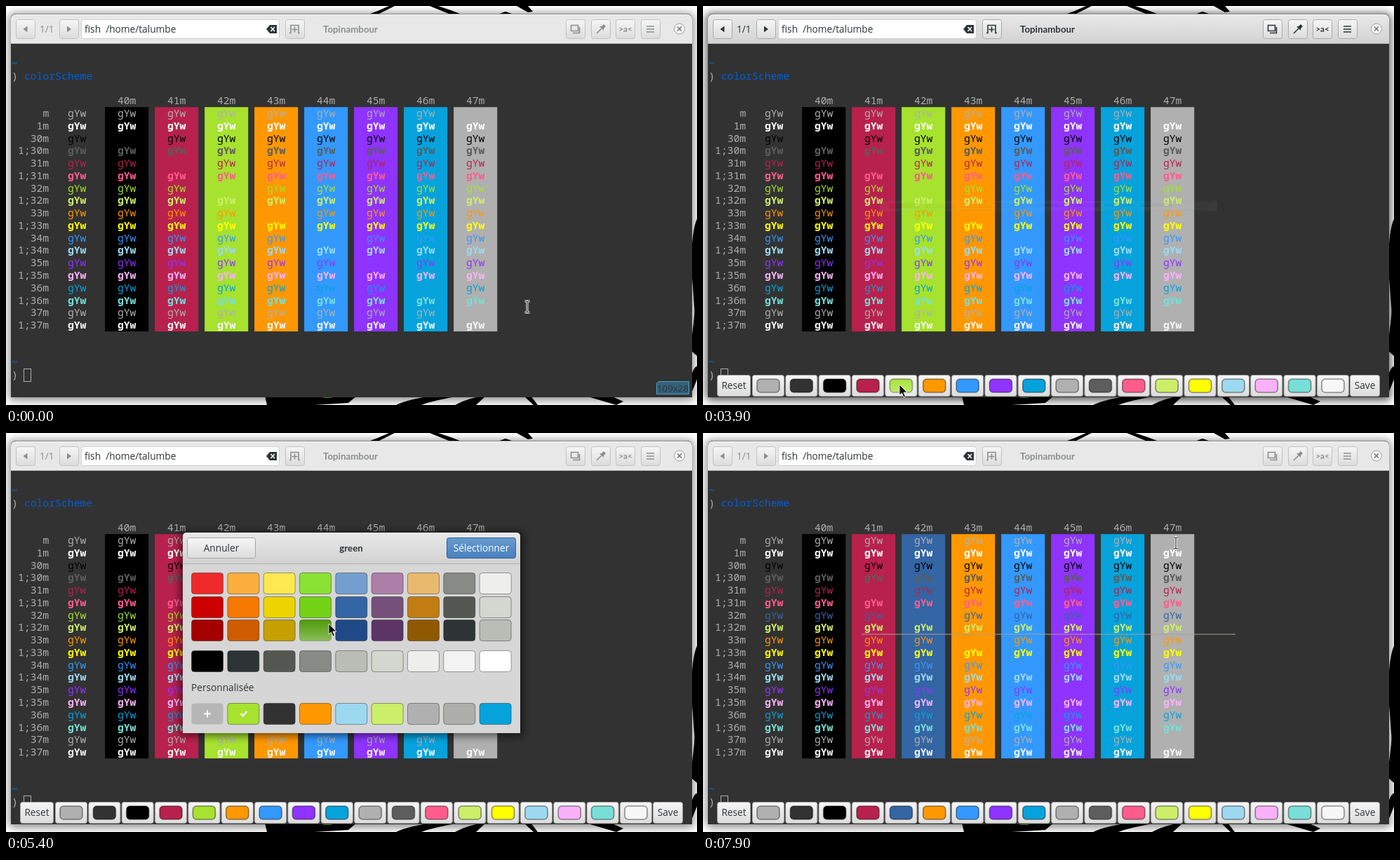
Animation, 985 px wide and 569 px high, one loop 8000 ms. Source, as an HTML page:

```html
<!DOCTYPE html>
<html lang="fr">
<head>
<meta charset="utf-8">
<title>Topinambour</title>
<style>
  html, body { margin: 0; width: 100%; height: 100%; overflow: hidden; background: #fff; }
  svg { display: block; width: 985px; height: 569px; --ink: #2e3436; --edge: #a9aba9; --green: #a6e22e; }
  svg.backdrop { --ink: #8b8e8f; --edge: #bfc1bf; }
  text { font: 13.7px "Open Sans", "Noto Sans", sans-serif; fill: #2e3436; }
  .mono { font: 300 14.79px "Noto Sans Mono", "DejaVu Sans Mono", monospace; fill: #aeaeae; }
  .bold { font-weight: 700; }
  .title { font: 700 13.3px Lato, "Open Sans", sans-serif; }
  .ink { fill: var(--ink); }
  .line { fill: none; stroke: var(--ink); stroke-width: 1.6; }
  .soft { filter: blur(6px); }
</style>
</head>
<body>
<script>
const LOOP = 8000;
const CELL_W = 8.875, CELL_H = 17.77, LEFT = 8, TABLE_TOP = 144.2;
const BLUE = '#3465a4', GREY = '#b0b0b0';
const normal = ['#000', '#b8214d', 'var(--green)', '#ff9800', '#3399ff', '#8f33ff', '#06a2dc', GREY];
const bright = ['#5d5d5d', '#ff5c8d', '#cdee69', '#ffff00', '#9cd9f0', '#fbb1f9', '#77dfd8', '#f7f7f7'];

function el(parent, tag, attrs = {}, content = '') {
  const node = document.createElementNS('http://www.w3.org/2000/svg', tag);
  for (const [key, value] of Object.entries(attrs)) {
    if (key === 'fill' || key === 'stroke') node.style[key] = value;
    else node.setAttribute(key, value);
  }
  if (content) node.textContent = content;
  parent.append(node);
  return node;
}
const group = parent => el(parent, 'g');
const rect = (parent, x, y, width, height, fill, more = {}) =>
  el(parent, 'rect', { x, y, width, height, fill, ...more });
const path = (parent, d, more = {}) => el(parent, 'path', { d, ...more });
const text = (parent, x, y, content, more = {}) => el(parent, 'text', { x, y, ...more }, content);
const show = (node, on) => { node.style.display = on ? '' : 'none'; };

const svg = el(document.body, 'svg', { viewBox: '0 0 985 569' });
const defs = el(svg, 'defs');
function gradient(id, top, bottom) {
  const g = el(defs, 'linearGradient', { id, x2: 0, y2: 1 });
  el(g, 'stop', { offset: 0, 'stop-color': top });
  el(g, 'stop', { offset: 1, 'stop-color': bottom });
}
gradient('bar', '#e9e9e9', '#d2d2d2');
gradient('button', '#f6f6f6', '#dcdcdc');
gradient('suggest', '#659bd0', '#4a80bd');
gradient('glow', 'rgba(255,255,255,0)', 'rgba(255,255,255,.35)');

function button(parent, x, y, w, h, fill = 'url(#button)', stroke = 'var(--edge)') {
  return rect(parent, x + .5, y + .5, w - 1, h - 1, fill, { stroke, rx: 3 });
}

// Wallpaper
rect(svg, 0, 0, 985, 569, '#fff');
path(svg, 'M514 13L530 7L546 0H554L536 9L528 13Z M604 0H616L634 6L652 13H636Z M698 13L712 8L724 12Z M728 0H744L751 8L744 9Z');
path(svg, 'M986 302C978 315 975 360 979 400L981 428C983 445 976 470 977 492L986 500Z M977 526Q982 512 986 514V530L977 552Z');
path(svg, 'M369 556H500L488 566L440 569H372Z M556 569Q575 560 610 556H648Q610 562 592 569Z M640 569Q660 558 684 556L670 569Z M738 556H748L758 569H752Z M826 556H862L880 564L870 569Z');
rect(svg, 452, 557, 12, 2, '#58b82c');

// Window
const shadow = rect(svg, 4, 10, 977, 553, '#000', { rx: 8, class: 'soft' });
path(svg, 'M7 558V19Q7 11 15 11H970Q978 11 978 19V558Z', { fill: '#323232' });
const headerBar = path(svg, 'M7 54V19Q7 11.500 15 11.500H970Q978 11.500 978 19V54Z');
rect(svg, 7, 53, 971, 1, '#b4b4b4');
rect(svg, 14, 12, 957, 1, '#fff', { opacity: .7 });

for (const x of [14, 76, 398, 798, 834, 869, 905]) button(svg, x, 19, 28, 28);
path(svg, 'M30.500 28.500V37.500L24.500 33Z M87 28.500V37.500L93 33Z', { class: 'ink' });
text(svg, 48, 37.5, '1/1', { class: 'ink' });
button(svg, 107, 19, 283, 28, '#fff', '#cfcfcf');
text(svg, 112, 37.5, 'fish\u00a0\u00a0/home/talumbe');
path(svg, 'M371 33L376 27H386V39H376Z', { fill: '#2e3436' });
path(svg, 'M377.500 30L383 36M383 30L377.500 36', { stroke: '#fff', 'stroke-width': 1.5 });
path(svg, 'M404 38.500H406V27.500H417V38.500H419M411.500 29.500V37.500M407.500 33.500H415.500', { class: 'line' });
text(svg, 452, 37.5, 'Topinambour', { class: 'title ink' });
path(svg, 'M805.500 27.500H815.500V35.500H805.500ZM817.500 30V38.500H808', { class: 'line' });
path(svg, 'M842 39L849 32', { class: 'line', 'stroke-width': 3 });
path(svg, 'M846 29L849 29L852 26L855 29L852 32L852 35Z', { class: 'ink' });
text(svg, 883, 37, '>a<', { class: 'title ink', 'text-anchor': 'middle', style: 'font-size:11.5px' });
path(svg, 'M913 29H924M913 33H924M913 37H924', { class: 'line', 'stroke-width': 2 });
el(svg, 'circle', { cx: 960, cy: 32.5, r: 7.5, fill: '#f3f3f3', stroke: '#a0a0a0' });
path(svg, 'M957 29.500L963 35.500M963 29.500L957 35.500', { stroke: '#777', 'stroke-width': 1.6 });

// Terminal
const rowTop = row => TABLE_TOP + row * CELL_H;
function print(col, row, content, fill, bold) {
  text(svg, LEFT + col * CELL_W, rowTop(row) + 13.8, content,
    { class: bold ? 'mono bold' : 'mono', ...(fill && { fill }) });
}
for (const row of [-4, 20]) {
  print(0, row, '~', '#0a70dc');
  print(0, row + 1, ')');
}
print(2, -3, 'colorScheme', '#005fd7');

const styles = [['m', GREY, false], ['1m', '#fff', true]];
normal.forEach((color, i) => styles.push([`3${i}m`, color, false], [`1;3${i}m`, bright[i], true]));
normal.forEach((color, i) => {
  const col = 15 + i * 8;
  rect(svg, LEFT + col * CELL_W, TABLE_TOP, 7 * CELL_W, 18 * CELL_H, color);
  print(col + 2, -1, `4${i}m`);
});
styles.forEach(([label, color, bold], row) => {
  print(6 - label.length, row, label);
  print(9, row, 'gYw', color, bold);
  normal.forEach((back, i) => {
    if (back !== color) print(17 + i * 8, row, 'gYw', color, bold);
  });
});

const block = rect(svg, 26, 518, 9, 18, '#aeaeae');
const hollow = rect(svg, 25.5, 517.5, 10, 18, 'none', { stroke: '#aeaeae' });

const sizeTag = group(svg);
path(sizeTag, 'M930 535.500H973.500V553.500H927.500V538Z', { fill: '#35617a', stroke: '#4a9dbf' });
text(sizeTag, 928, 549.5, '109x28', { fill: '#20282c', style: 'font-size:13.3px' });

// Colour toolbar
const hoverables = [];
function hoverable(parent, x, y, w, h, kind) {
  hoverables.push({ x, y, w, h, kind, node: rect(parent, x, y, w, h, 'url(#glow)', { rx: 4 }) });
}
const toolbar = group(svg);
button(toolbar, 20, 526, 48, 31, undefined, '#a5a5a5');
text(toolbar, 44, 546, 'Reset', { 'text-anchor': 'middle' });
[GREY, '#323232', ...normal, ...bright].forEach((color, i) => {
  const x = 70 + i * 47.35;
  button(toolbar, x, 526, 46, 31, undefined, '#a5a5a5');
  rect(toolbar, x + 7, 532, 32, 19, color, { rx: 5 });
  rect(toolbar, x + 7, 532, 32, 19, 'none', { rx: 5, stroke: 'rgba(0,0,0,.42)', 'stroke-width': 1.6 });
  hoverable(toolbar, x, 527, 46, 29, 'bar');
});
button(toolbar, 922, 526, 43, 31, undefined, '#a5a5a5');
text(toolbar, 943.5, 546, 'Save', { 'text-anchor': 'middle' });

// Colour dialog
const dialog = group(svg);
rect(dialog, 248, 141, 489, 291, '#000', { class: 'soft', opacity: .55 });
path(dialog, 'M252 428V148Q252 142 258 142H727Q733 142 733 148V428Z', { fill: '#d6d6d6' });
path(dialog, 'M252 186V148Q252 142 258 142H727Q733 142 733 148V186Z', { fill: 'url(#bar)' });
rect(dialog, 252, 186, 481, 1, '#b3b3b3');
button(dialog, 258, 149, 98, 30, undefined, '#a5a5a5');
text(dialog, 307, 169, 'Annuler', { 'text-anchor': 'middle' });
text(dialog, 492, 169, 'green', { class: 'title', 'text-anchor': 'middle' });
button(dialog, 628, 149, 99, 30, 'url(#suggest)', '#2f5f96');
text(dialog, 677.5, 169, 'Sélectionner', { 'text-anchor': 'middle', fill: '#fff' });
text(dialog, 264, 367.5, 'Personnalisée');

const swatchRows = [
  [199, 'ef2929 fcaf3e fce94f 8ae234 729fcf ad7fa8 e9b96e 888a85 eeeeec'],
  [233, 'cc0000 f57900 edd400 73d216 3465a4 75507b c17d11 555753 d3d7cf'],
  [266, 'a40000 ce5c00 c4a000 4e9a06 204a87 5c3566 8f5902 2e3436 babdb6'],
  [310, '000000 2e3436 555753 888a85 babdb6 d3d7cf eeeeec f3f3f3 ffffff'],
  [385, 'b6b6b6 a6e22e 323232 ff9800 9cd9f0 cdee69 b0b0b0 aeaeab 06a2dc'],
];
for (const [y, colors] of swatchRows) {
  colors.split(' ').forEach((color, i) => {
    const x = 264 + i * 51.33, plain = y === 385 && i === 0;
    rect(dialog, x + .5, y + .5, 45, 30, '#' + color,
      { rx: 4, stroke: plain ? 'none' : 'rgba(0,0,0,.36)' });
    hoverable(dialog, x, y, 46, 31, 'dialog');
  });
}
path(dialog, 'M287 395.500V405.500M282 400.500H292', { stroke: '#fff', 'stroke-width': 2 });
const check = (x, y) => path(dialog, `M${x - 4.5} ${y}L${x - 1.5} ${y + 3.5}L${x + 4.5} ${y - 3}`,
  { fill: 'none', stroke: '#fff', 'stroke-width': 2.4 });
const customCheck = check(339, 400), blueCheck = check(492.5, 248);
const closingLine = rect(svg, 226, 286.5, 533, 1, '#a89f98');

// Pointer
const ibeam = group(svg);
const beamShape = 'M-3.500 -8H-1L0 -7L1 -8H3.500M0 -7V7M-3.500 8H-1L0 7L1 8H3.500';
path(ibeam, beamShape, { fill: 'none', stroke: '#fff', 'stroke-width': 3 });
path(ibeam, beamShape, { fill: 'none', stroke: '#111', 'stroke-width': 1 });
const arrow = path(svg, 'M0 0V15L3.500 12L6 18L8.500 17L6 11H11Z',
  { fill: '#111', stroke: '#fff', 'stroke-width': .8 });

// Steps: time, then values held until the next row
const pointerSteps = [
  [0, 743, 429], [500, 745, 430], [600, 748, 430], [700, 750, 429],
  [2500, 735, 435], [2600, 682, 452], [2700, 603, 475], [2800, 512, 496], [2900, 429, 510],
  [3000, 385, 517], [3100, 352, 524], [3200, 334, 533], [3300, 326, 539],
  [3400, 312, 541], [3500, 292, 542], [3600, 280, 540],
  [4300, 284, 530], [4400, 300, 511], [4500, 322, 489], [4600, 342, 468], [4700, 353, 455],
  [4800, 359, 444], [4900, 369, 424], [5000, 386, 394], [5100, 409, 350], [5200, 432, 315],
  [5300, 452, 288], [5400, 460, 272], [5600, 478, 267], [5700, 488, 262],
  [5900, 489, 258], [6000, 491, 250], [6100, 493, 242], [6200, 495, 235], [6400, 494, 239],
  [6800, 505, 233], [6900, 545, 215], [7000, 600, 193], [7100, 645, 175], [7200, 668, 163], [7300, 674, 157],
];
const dialogSteps = [[0, 0], [3900, .05], [4000, .36], [4100, .675], [4200, 1], [7700, .68], [7800, .34], [7900, 0]];
const cursorSteps = [[0, 'hollow'], [600, 'block'], [1300, ''], [1800, 'block'], [3500, ''], [3900, 'hollow']];
const at = (steps, t) => steps.findLast(step => t >= step[0]).slice(1);
const between = (t, from, to) => t >= from && t < to;

function draw(t) {
  const focused = between(t, 1300, 4500);
  svg.classList.toggle('backdrop', !focused);
  headerBar.style.fill = focused ? 'url(#bar)' : '#e8e8e8';
  shadow.setAttribute('opacity', focused ? .62 : .42);
  svg.style.setProperty('--green', t >= 7700 ? BLUE : '#a6e22e');

  const [cursor] = at(cursorSteps, t);
  show(block, cursor === 'block');
  show(hollow, cursor === 'hollow');
  show(sizeTag, t < 500 || between(t, 1300, 1800));
  show(toolbar, t >= 1800);

  const [scale] = at(dialogSteps, t);
  show(dialog, scale > 0);
  dialog.setAttribute('opacity', scale);
  dialog.setAttribute('transform', `translate(0 ${285.5 * (1 - scale)}) scale(1 ${scale})`);
  show(customCheck, t < 6700);
  show(blueCheck, t >= 6700);
  show(closingLine, t >= 7900);

  const pointer = at(pointerSteps, t), [x, y] = pointer;
  const inDialog = between(t, 4200, 7700) && x > 252 && x < 733 && y > 142 && y < 428;
  const isArrow = inDialog || y > 526;
  show(arrow, isArrow);
  show(ibeam, !isArrow);
  (isArrow ? arrow : ibeam).setAttribute('transform', `translate(${x} ${y})`);

  // The toolbar keeps its highlight for a moment after the dialog opens
  const barPointer = between(t, 4200, 4800) ? at(pointerSteps, 4200) : pointer;
  for (const h of hoverables) {
    const [px, py] = h.kind === 'bar' ? barPointer : pointer;
    show(h.node, px >= h.x && px < h.x + h.w && py >= h.y && py < h.y + h.h);
  }
}

const start = performance.now();
function tick() {
  draw((performance.now() - start) % LOOP);
  requestAnimationFrame(tick);
}
tick();
</script>
</body>
</html>
```
